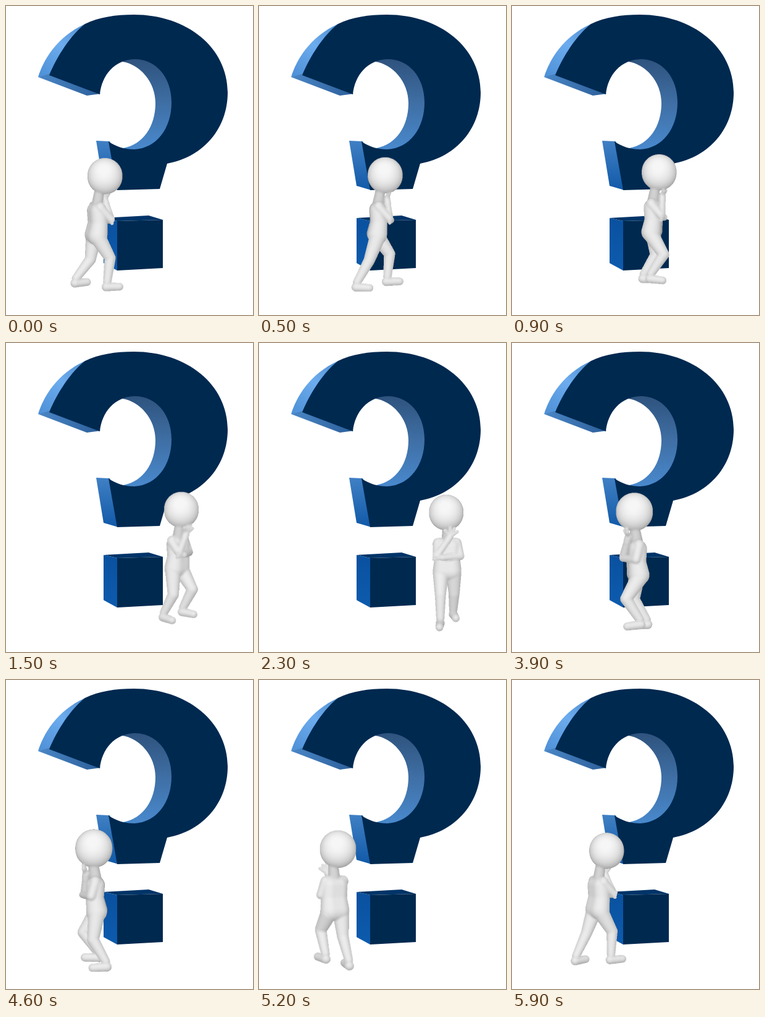
Write an HTML page with a canvas that moves like this. It is 400 px wide and 500 px high and loops after 6 s.

```html
<!DOCTYPE html>
<html lang="en">
<head>
<meta charset="utf-8">
<title>Pacing thinker</title>
<style>
  html, body { margin: 0; width: 100%; height: 100%; overflow: hidden; background: #fff; }
  svg, canvas { position: absolute; left: 0; top: 0; width: 400px; height: 500px; display: block; }
</style>
</head>
<body>
<svg viewBox="0 0 400 500">
  <defs>
    <linearGradient id="rim" x1="0" y1="1" x2="1" y2="0">
      <stop offset="0" stop-color="#4d8fd6"/><stop offset=".5" stop-color="#6cacee"/><stop offset="1" stop-color="#4a86c6"/>
    </linearGradient>
    <linearGradient id="tip" x1="0" y1="0" x2="1" y2="0">
      <stop offset="0" stop-color="#4a86c6"/><stop offset="1" stop-color="#2c5f9a"/>
    </linearGradient>
    <linearGradient id="bore" x1="0" y1="0" x2="0" y2="1">
      <stop offset="0" stop-color="#2c4f78"/><stop offset=".5" stop-color="#3f6fa5"/><stop offset="1" stop-color="#4a8cd2"/>
    </linearGradient>
    <linearGradient id="stem" x1="0" y1="0" x2="0" y2="1">
      <stop offset="0" stop-color="#4080c4"/><stop offset="1" stop-color="#1159a8"/>
    </linearGradient>
    <linearGradient id="side" x1="0" y1="0" x2="0" y2="1">
      <stop offset="0" stop-color="#0a519f"/><stop offset="1" stop-color="#0d5bae"/>
    </linearGradient>
  </defs>
  <path fill="url(#rim)" d="M52 115C60 88 82 50 128 29L150 40L72 113Z"/>
  <path fill="url(#tip)" d="M52 115L70 110L153 142L131 145Z"/>
  <path fill="url(#bore)" d="M188 90C216 94 242 122 242 157C242 195 222 224 190 230L208 240L290 228L290 76L200 80Z"/>
  <path fill="url(#stem)" d="M146 218L168 219L182 298L158 291Z"/>
  <path fill="#002950" d="M70 112C78 92 99 52 128 29C150 18 178 14 207 14C294 14 359 68 359 140C359 197 321 244 261 255L249 296L180 298L166 219C178 228 193 232 208 232C244 230 268 198 268 156C268 114 242 86 208 86C176 87 155 112 152 143Z"/>
  <path fill="#003468" d="M158 343L231 339L254 346L180 348Z"/>
  <path fill="url(#side)" d="M158 343L180 348L180 428L158 416Z"/>
  <path fill="#002950" d="M180 348L254 346L254 424L180 428Z"/>
</svg>
<canvas id="stage" width="400" height="500"></canvas>
<script>
const LOOP = 6000, STEP = 100, W = 300, H = 520, Q = 2;
const ctx = document.getElementById('stage').getContext('2d');
const buf = document.createElement('canvas');
buf.width = W; buf.height = H;
const bctx = buf.getContext('2d');
const img = bctx.createImageData(W, H);
const depth = new Float32Array(W * H), shade = new Float32Array(W * H);

// time, head x, head y without bob, heading in degrees, scale, strides walked
const keys = [
  [0, 160, 274, 340, .957, .083], [900, 238, 270.5, 370, .953, .8],
  [1600, 289, 271, 405, .945, 1.4], [2300, 303, 272, 446, .945, 2],
  [3100, 265, 272, 493, 1.005, 2.67], [3900, 198, 274.5, 528, 1.01, 3.3],
  [4600, 142, 274, 542, 1.015, 3.79], [5250, 128, 274, 608, .99, 4.4],
  [5900, 153, 274, 688, .95, 5], [6000, 160, 274, 700, .957, 5.083]
];

// Smooth curve through the keys.
function poseAt(t) {
  let i = 0;
  while (t >= keys[i + 1][0]) i++;
  const a = keys[i], b = keys[i + 1], span = b[0] - a[0], k = (t - a[0]) / span;
  const before = keys[Math.max(0, i - 1)], after = keys[Math.min(keys.length - 1, i + 2)];
  return a.map((v, j) => {
    const m = (b[j] - before[j]) / (b[0] - before[0]) * span;
    const n = (after[j] - a[j]) / (after[0] - a[0]) * span;
    const d = b[j] - v;
    return v + k * (m + k * (3 * d - 2 * m - n + k * (m + n - 2 * d)));
  });
}

// Stamp a lit sphere into the depth buffer.
function ball(x, y, z, r, gain) {
  const x0 = Math.max(0, Math.ceil(x - r)), x1 = Math.min(W - 1, Math.floor(x + r));
  const y0 = Math.max(0, Math.ceil(y - r)), y1 = Math.min(H - 1, Math.floor(y + r));
  for (let j = y0; j <= y1; j++) {
    for (let i = x0; i <= x1; i++) {
      const dx = i - x, dy = j - y, h = r * r - dx * dx - dy * dy;
      if (h < 0) continue;
      const hz = Math.sqrt(h), n = j * W + i;
      if (z + hz <= depth[n]) continue;
      depth[n] = z + hz;
      shade[n] = gain * (136 + 97 * Math.pow(hz / r, .65) - 22 * dy / r - 5 * dx / r);
    }
  }
}

function drawFigure(t) {
  depth.fill(-1e4);
  const [, headX, base, deg, size, strides] = poseAt(t);
  const yaw = deg * Math.PI / 180, cy = Math.cos(yaw), sy = Math.sin(yaw);
  const walk = 2 * Math.PI * strides;
  const headY = base + 2 * Math.cos(2 * walk);
  const left = headX - 75, top = headY - 35;
  const shift = -4 - 7 * cy + 6 * sy;

  // Body point: forward, to its right, below the head centre.
  const place = ([f, r, d]) => {
    const z = f * sy + r * cy;
    return [Q * (75 + shift + size * (f * cy - r * sy)), Q * (35 + size * (d + z * d * .0015)), Q * size * z];
  };
  function limb(a, b, ra, rb, gain = 1) {
    const p = place(a), q = place(b), s = Q * size;
    const n = Math.ceil(Math.hypot(q[0] - p[0], q[1] - p[1], q[2] - p[2])) + 1;
    for (let i = 0; i <= n; i++) {
      const k = i / n, mix = j => p[j] + (q[j] - p[j]) * k;
      ball(mix(0), mix(1), mix(2), s * (ra + (rb - ra) * k), gain);
    }
  }

  for (let i = -1; i <= 1; i += .5) ball(Q * 75, Q * (35 + i), 0, Q * size * 29.6, 1.05);

  limb([4, 0, 24], [0, 0, 50], 8, 10, .9);
  for (let r = -8; r <= 8; r += 4) {
    limb([0, r, 59], [1, r, 80], 14.5, 14);
    limb([1, r, 80], [-2, r, 100], 14, 16.5);
  }
  for (const side of [1, -1]) {
    limb([0, 0, 51], [0, side * 16, 52], 9, 8.5);
    leg(side);
  }

  // One forearm folded across, the other propping the chin.
  const elbowR = [18, 19, 72], wristR = [16, 1, 48];
  limb([0, 17, 53], elbowR, 8, 6.5);
  limb(elbowR, wristR, 6.5, 5.5);
  limb(wristR, [15, -4, 40], 6, 6);
  for (const [r, d] of [[-16, 32], [-11, 27], [-4, 25], [5, 30]]) limb([15, -4, 40], [19, r, d], 3.6, 2.8);
  const elbowL = [6, -22, 74], wristL = [21, 10, 75];
  limb([0, -17, 53], elbowL, 8, 7);
  limb(elbowL, wristL, 7, 5.5);
  for (let i = 0; i < 3; i++) limb(wristL, [20 - i, 24, 70 + 4 * i], 3.8, 2.8);

  function leg(side) {
    const c = side * Math.cos(walk), lift = Math.max(0, -side * Math.sin(walk));
    const hip = [-2, side * 11, 103], ankle = [-10 + 27 * c, side * 13, 177 - 8 * lift];
    const df = ankle[0] - hip[0], dd = ankle[2] - hip[2], len = Math.hypot(df, dd);
    const bend = Math.sqrt(Math.max(12, 40 * 40 - len * len / 4));
    const knee = [hip[0] + df / 2 + bend * dd / len, side * 13, hip[2] + dd / 2 - bend * df / len];
    limb(hip, knee, 13.5, 9.5);
    limb(knee, ankle, 9.5, 7);
    limb([ankle[0] - 2, side * 13, ankle[2] + 8], [ankle[0] + 21, side * 16, ankle[2] + 9], 7.5, 6.5);
  }

  paint();
  ctx.clearRect(0, 0, 400, 500);
  ctx.imageSmoothingQuality = 'high';
  ctx.drawImage(buf, left, top, W / Q, H / Q);
}

// Soften the creases where parts meet, then write the greys.
function paint() {
  const px = img.data;
  for (let y = 0; y < H; y++) {
    for (let x = 0; x < W; x++) {
      const n = y * W + x, z = depth[n], o = n * 4;
      if (z < -9e3) { px[o + 3] = 0; continue; }
      let sum = 0, count = 0;
      for (let j = -4; j <= 4; j += 2) {
        for (let i = -4; i <= 4; i += 2) {
          const u = x + i, v = y + j;
          if (u < 0 || v < 0 || u >= W || v >= H) continue;
          const m = v * W + u;
          if (Math.abs(depth[m] - z) < 9) { sum += shade[m]; count++; }
        }
      }
      px[o] = px[o + 1] = px[o + 2] = Math.min(246, sum / count);
      px[o + 3] = 255;
    }
  }
  bctx.putImageData(img, 0, 0);
}

let shown = -1;
function tick() {
  const step = Math.floor(performance.now() % LOOP / STEP);
  if (step !== shown) drawFigure((shown = step) * STEP);
  requestAnimationFrame(tick);
}
tick();
</script>
</body>
</html>
```
